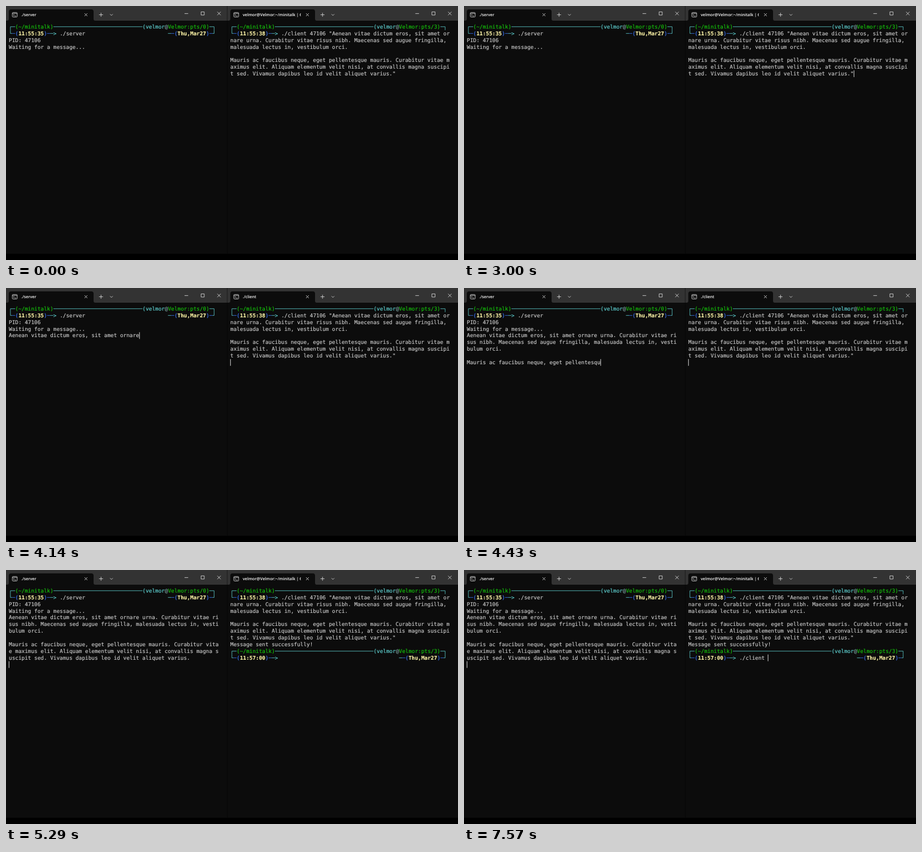
An HTML page for the animation above (8 s loop, 800 by 450 pixels).

```html
<!DOCTYPE html>
<html lang="en">
<head>
<meta charset="utf-8">
<title>Two terminals</title>
<style>
  html, body { margin: 0; width: 100%; height: 100%; overflow: hidden; background: #000; }
  svg { display: block; width: 800px; height: 450px; }
  text { white-space: pre; text-rendering: geometricPrecision; }
  .cell { font: 9.357px "DejaVu Sans Mono", "Liberation Mono", monospace; stroke-width: .15px; }
  .tab { font: 600 7.2px "Open Sans", "Noto Sans", sans-serif; fill: #fff; }
  .plain { fill: #ccc; stroke: #ccc; }
  .cyan { fill: #61d6d6; stroke: #61d6d6; }
  .green { fill: #16c60c; stroke: #16c60c; }
  .blue { fill: #3b78ff; stroke: #3b78ff; }
  .grey { fill: #7fa3a3; stroke: #7fa3a3; }
  .yellow { fill: #f9f1a5; stroke: #f9f1a5; font-weight: bold; }
  .rule { fill: none; stroke-width: .8px; }
  .icon { fill: none; stroke: #e8e8e8; stroke-width: .8px; }
</style>
</head>
<body>
<svg id="stage" viewBox="0 0 800 450"></svg>
<script>
const CELL_W = 5.633, CELL_H = 11.89, TOP = 30.8, BASE = 9.1;
const LOOP = 8000, TICK = 1000 / 7;
const MESSAGE = "Aenean vitae dictum eros, sit amet ornare urna. Curabitur vitae risus nibh. " +
  "Maecenas sed augue fringilla, malesuada lectus in, vestibulum orci.\n\n" +
  "Mauris ac faucibus neque, eget pellentesque mauris. Curabitur vitae maximus elit. " +
  "Aliquam elementum velit nisi, at convallis magna suscipit sed. " +
  "Vivamus dapibus leo id velit aliquet varius.";
const USER = "velmor", HOST = "Velmor";

function add(parent, tag, attrs, text) {
  const el = document.createElementNS("http://www.w3.org/2000/svg", tag);
  for (const key in attrs) el.setAttribute(key, attrs[key]);
  if (text) el.textContent = text;
  parent.appendChild(el);
  return el;
}

const show = (el, on) => el.setAttribute("visibility", on ? "visible" : "hidden");
const rowTop = row => TOP + row * CELL_H;
const rowMid = row => rowTop(row) + CELL_H / 2;

function put(g, row, col, text, color = "plain") {
  return add(g, "text", { x: col * CELL_W, y: rowTop(row) + BASE, class: "cell " + color }, text);
}

function rule(g, row, from, to, color = "cyan") {
  add(g, "path", { class: "rule " + color, style: "fill:none",
    d: `M${from * CELL_W} ${rowMid(row)}H${to * CELL_W}` });
}

// Corner joining a bar to the vertical edge; dir is 1 for down, -1 for up.
function corner(g, row, col, toCol, dir) {
  add(g, "path", { class: "rule cyan", style: "fill:none",
    d: `M${(col + .5) * CELL_W} ${rowMid(row) + dir * CELL_H / 2}V${rowMid(row)}H${toCol * CELL_W}` });
}

function wrap(text, width) {
  return text.split("\n").flatMap(line => {
    const rows = [];
    do { rows.push(line.slice(0, width)); line = line.slice(width); } while (line);
    return rows;
  });
}

function prompt(g, row, width, pts, clock, date) {
  const who = width - 23;
  corner(g, row, 0, 2, 1);
  put(g, row, 2, "(~/minitalk)", "green");
  rule(g, row, 14, who);
  put(g, row, who, "(" + USER, "cyan");
  put(g, row, who + 7, "@", "grey");
  put(g, row, who + 8, `${HOST}:pts/${pts})`, "green");
  corner(g, row, width - 1, width - 2, 1);

  corner(g, row + 1, 0, 1, -1);
  rule(g, row + 1, 1, 2, "blue");
  put(g, row + 1, 2, "(", "blue");
  put(g, row + 1, 3, clock, "yellow");
  put(g, row + 1, 11, ")", "blue");
  rule(g, row + 1, 12, 13, "blue");
  rule(g, row + 1, 13, 14);
  put(g, row + 1, 14, ">", "cyan");
  if (!date) return;
  const day = width - 13;
  rule(g, row + 1, day - 2, day - 1);
  rule(g, row + 1, day - 1, day, "blue");
  put(g, row + 1, day, "(", "blue");
  put(g, row + 1, day + 1, date, "yellow");
  put(g, row + 1, day + 10, ")", "blue");
  rule(g, row + 1, day + 11, day + 12, "blue");
  corner(g, row + 1, width - 1, width - 1, -1);
}

function makeWindow(x, width, id) {
  const win = add(stage, "g", { transform: `translate(${x} 0)` });
  add(win, "rect", { width, height: 439, fill: "#0c0c0c" });
  add(win, "rect", { width, height: 26, fill: "#333" });
  add(win, "path", { fill: "#0c0c0c",
    d: "M2 26Q5 26 5 23V10Q5 6 9 6H151Q155 6 155 10V23Q155 26 158 26Z" });
  add(win, "path", { class: "icon",
    d: "M12.5 11.5H18.5Q19.8 11.5 19.8 12.8V18.2Q19.8 19.5 18.5 19.5H12.5Q11.2 19.5 11.2 18.2V12.8" +
       "Q11.2 11.5 12.5 11.5ZM11.2 13.4H19.8M13 15L14.5 16.3L13 17.6M15.6 17.6H17.8" });
  const clip = add(win, "clipPath", { id });
  add(clip, "rect", { x: 26, y: 6, width: 104, height: 20 });
  const title = add(win, "text", { x: 27, y: 18.4, class: "tab", "clip-path": `url(#${id})` });
  const end = width - 14.5;
  add(win, "path", { class: "icon",
    d: "M139 13L144 18M144 13L139 18M164.7 15.5H171.7M168.2 12V19M184.2 14.4L186.6 16.8L189 14.4" +
       `M${end - 61} 13.4h6.4M${end - 31.7} 10.4h5.6v5.6h-5.6z` +
       `M${end - 3} 10.3l6 6m0 -6l-6 6` });
  const body = add(win, "g", { transform: "translate(5 0)" });
  const cursor = add(body, "rect", { width: 1, height: CELL_H, fill: "#d8d8d8" });
  return { body, title, cursor };
}

function moveCursor(win, row, col, on = true) {
  win.cursor.setAttribute("x", col * CELL_W - .2);
  win.cursor.setAttribute("y", rowTop(row));
  show(win.cursor, on);
}

const stage = document.getElementById("stage");
const server = makeWindow(0, 391.5, "serverTab");
const client = makeWindow(392, 408, "clientTab");
add(stage, "rect", { x: 391.2, width: .8, height: 26, fill: "#1c1c1c" });

server.title.textContent = "./server";
prompt(server.body, 0, 65, 0, "11:55:35", "Thu,Mar27");
put(server.body, 1, 16, "./server");
put(server.body, 2, 0, "PID: 47106");
put(server.body, 3, 0, "Waiting for a message...");
const received = wrap(MESSAGE, 66).map((_, i) => put(server.body, 4 + i, 0, ""));

prompt(client.body, 0, 68, 3, "11:55:38");
wrap(" ".repeat(16) + `./client 47106 "${MESSAGE}"`, 69).forEach((line, i) => {
  const pad = i ? 0 : 16;
  put(client.body, 1 + i, pad, line.slice(pad));
});
const sent = put(client.body, 8, 0, "Message sent successfully!");
const nextPrompt = add(client.body, "g", {});
prompt(nextPrompt, 9, 68, 3, "11:57:00", "Thu,Mar27");
const command = put(client.body, 10, 16, "");

const SEND = 29, DONE = 34, READY = 35;
const KEYS = [42, 43, 46, 47, 48.5, 49, 50, 52, 53];

function drawServer(tick) {
  const count = tick < SEND ? 0 : 41 + 73 * (tick - SEND);
  const lines = wrap(MESSAGE.slice(0, count), 66);
  received.forEach((el, i) => { el.textContent = lines[i] || ""; });
  const last = lines.length - 1;
  if (count > MESSAGE.length) moveCursor(server, 5 + last, 0);
  else moveCursor(server, 4 + last, lines[last].length, count > 0);
}

function drawClient(tick) {
  const typed = KEYS.filter(key => key <= tick).length;
  const running = tick >= SEND && tick < READY;
  client.title.textContent = running ? "./client" : `${USER}@${HOST}:~/minitalk | 6`;
  show(sent, tick >= DONE);
  show(nextPrompt, tick >= READY);
  command.textContent = "./client ".slice(0, typed);
  if (tick < SEND) moveCursor(client, 7, 52, tick >= 14 && (tick - 14) % 7 < 4);
  else if (running) moveCursor(client, tick < DONE ? 8 : 9, 0);
  else moveCursor(client, 10, 16 + typed, tick < 37 || tick >= 41);
}

let lastTick = -1;
const start = performance.now();
function frame() {
  const time = (performance.now() - start) % LOOP;
  const tick = Math.floor((time + 3) / TICK);
  if (tick !== lastTick) {
    drawServer(tick);
    drawClient(tick);
    lastTick = tick;
  }
  requestAnimationFrame(frame);
}
frame();
</script>
</body>
</html>
```
